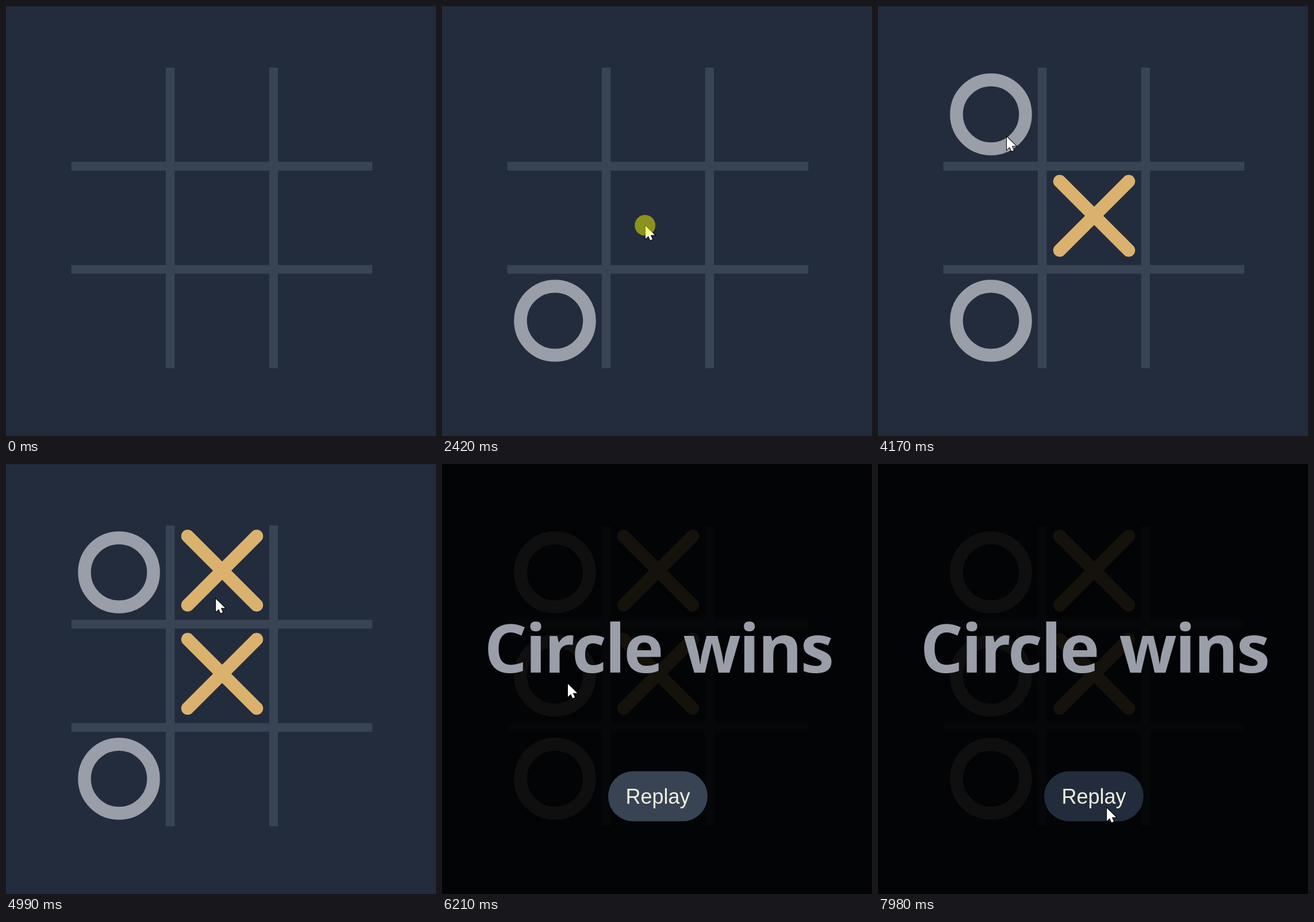
An HTML page for the animation above (8 s loop, 748 by 748 pixels).

```html
<!DOCTYPE html>
<html lang="en">
<head>
<meta charset="utf-8">
<title>Noughts and crosses</title>
<style>
  html, body { margin: 0; width: 100%; height: 100%; overflow: hidden; background: #232c3c; }
  svg { display: block; width: 100vw; height: 100vh; }
  .grid { fill: #384454; }
  .mark { fill: none; stroke-width: 22.5; stroke-linecap: round; }
  .o { stroke: #9a9ea8; }
  .x { stroke: #dab26e; }
  .title { font: 700 117px "Open Sans", "Noto Sans", sans-serif; letter-spacing: -2.8px; fill: #9a9ea8; }
  .label { font: 36px "Liberation Sans", Arial, sans-serif; text-anchor: middle; fill: #f1f0df; }
  #button { fill: #384454; }
  #button.hover { fill: #232c3c; }
  [data-from] { visibility: hidden; }
</style>
</head>
<body>
<svg viewBox="0 0 748 748">
  <rect width="748" height="748" fill="#232c3c"/>
  <rect width="748" height="1" fill="#1b2331"/>
  <path class="grid" d="M278 107h15.3v523h-15.3zM457.8 107h15.2v523h-15.2zM113.7 271h523.5v15.2h-523.5zM113.7 450.7h523.5v15h-523.5z"/>

  <circle class="mark o" cx="196.5" cy="547.5" r="60" data-from="1160"/>
  <path class="mark x" d="M316 305l120 120m0-120l-120 120" data-from="2490"/>
  <circle class="mark o" cx="196.5" cy="188.5" r="60" data-from="3640"/>
  <path class="mark x" d="M316 125.5l120 120m0-120l-120 120" data-from="4990"/>
  <circle class="mark o" cx="196.5" cy="368" r="60" data-from="6210"/>

  <g data-from="6210">
    <rect width="748" height="748" opacity=".9"/>
    <text class="title" y="363"><tspan x="73.4">Circle</tspan><tspan x="419.5">wins</tspan></text>
    <rect id="button" x="289" y="534.5" width="173" height="87" rx="43.5"/>
    <text class="label" x="375.5" y="590.5">Replay</text>
  </g>

  <g id="pointer" data-from="190">
    <path d="M0 .5V23l5-4.7L8.3 25.6l3.8-1.6L8.9 16.6H16.3z" fill="#fff" stroke="#000" stroke-width="2" paint-order="stroke"/>
    <circle id="press" cx="-.8" cy="-.5" r="18" fill="#ff0" opacity=".48"/>
  </g>
</svg>
<script>
  const LOOP = 8000;
  const pointer = document.getElementById('pointer');
  const press = document.getElementById('press');
  const button = document.getElementById('button');
  const timed = [...document.querySelectorAll('[data-from]')];

  const easeOut = p => 1 - (1 - p) ** 2;
  const easeInOut = p => (1 - Math.cos(Math.PI * p)) / 2;

  // Each move: first and last step time, step count, start, bend and end points.
  const moves = [
    { t0: 190, t1: 750, n: 8, a: [528, 708], b: [340, 630], c: [216, 562], ease: easeOut, enter: true },
    { t0: 1420, t1: 1820, n: 7, a: [216, 562], b: [318, 500], c: [354, 382] },
    { t0: 2960, t1: 3430, n: 8, a: [354, 382], b: [277, 304], c: [214, 224] },
    { t0: 4170, t1: 4520, n: 6, a: [214, 224], b: [290, 244], c: [365, 234] },
    { t0: 5330, t1: 5810, n: 8, a: [365, 234], b: [297, 300], c: [219, 382] },
    { t0: 7430, t1: 7980, n: 9, a: [219, 382], b: [312, 498], c: [398, 598] }
  ];
  const presses = [[1080, 1160], [2420, 2490], [3570, 3640], [4920, 4990], [6080, 6140]];

  function place(t) {
    const m = moves.findLast(v => t >= v.t0) || moves[0];
    const gaps = m.enter ? m.n : m.n - 1;
    const step = Math.max(0, Math.floor((t - m.t0) / (m.t1 - m.t0) * gaps + 0.01));
    const p = Math.min(1, (step + (m.enter ? 0 : 1)) / m.n);
    const k = (m.ease || easeInOut)(p), j = 1 - k;
    return [0, 1].map(i => Math.round(j * j * m.a[i] + 2 * j * k * m.b[i] + k * k * m.c[i]));
  }

  function draw(t) {
    for (const el of timed) el.style.visibility = t >= +el.dataset.from ? 'visible' : 'hidden';
    const [x, y] = place(t);
    pointer.setAttribute('transform', `translate(${x} ${y})`);
    press.style.display = presses.some(([on, off]) => t >= on && t < off) ? '' : 'none';
    button.classList.toggle('hover', t >= 7430 && y >= 535);
  }

  const start = performance.now();
  function tick() {
    draw((performance.now() - start) % LOOP);
    requestAnimationFrame(tick);
  }
  tick();
</script>
</body>
</html>
```
